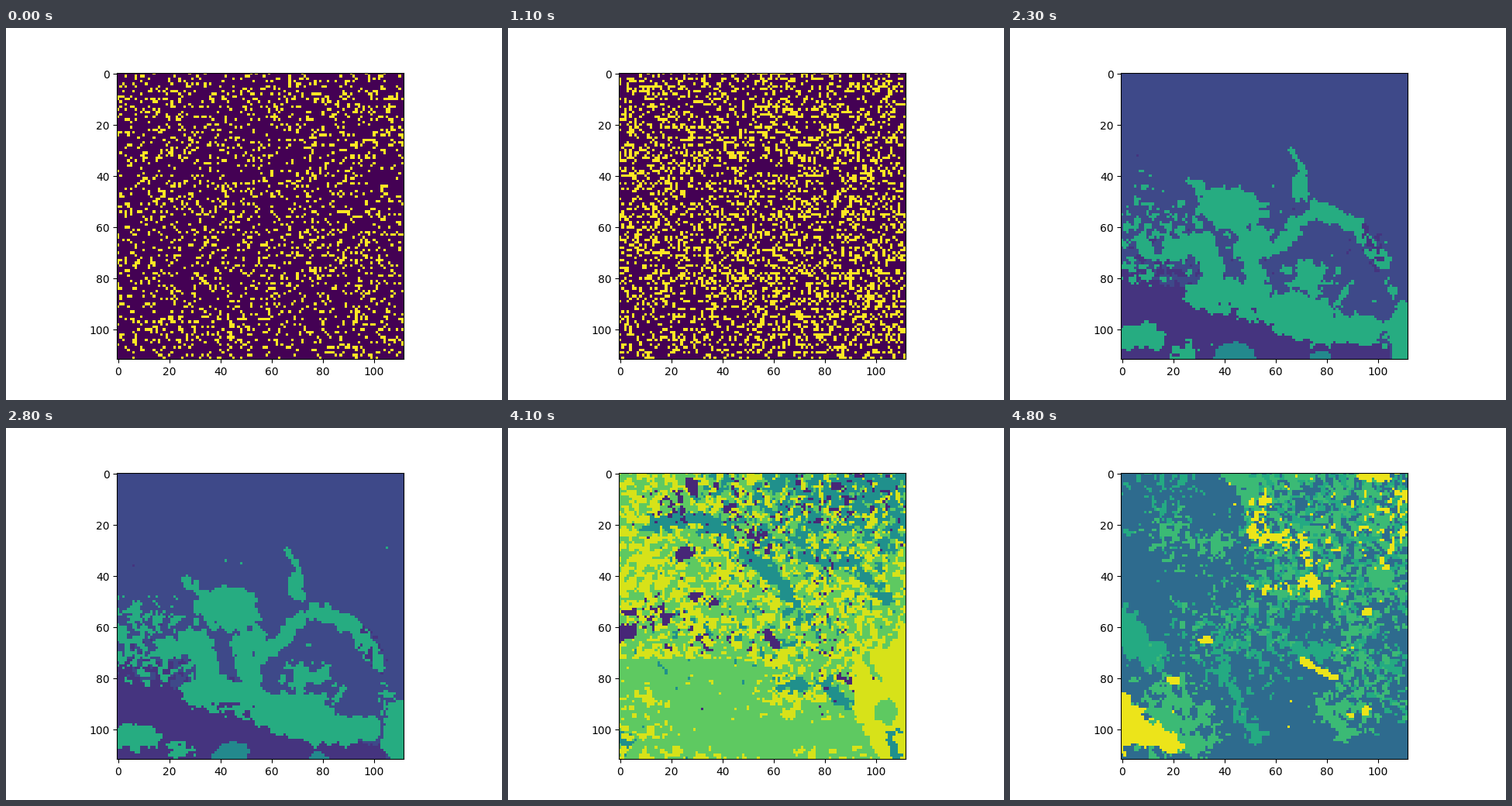
A matplotlib script that plays this animation: 640x480 px, repeating every 4.9 s.

```python
import numpy as np
import matplotlib.pyplot as plt
from matplotlib.animation import FuncAnimation

SIZE, FRAMES, INTERVAL = 112, 49, 100
Y, X = np.mgrid[0:SIZE, 0:SIZE].astype(float)


def ramp(a, lo, hi):
    return np.clip((a - lo) / (hi - lo), 0, 1)


def bell(x, y, sx, sy):
    return np.exp(-((X - x) / sx) ** 2 - ((Y - y) / sy) ** 2)


def ellipse(x, y, rx, ry, tilt=0):
    """Approximate depth inside a tilted ellipse, negative outside."""
    c, s = np.cos(tilt), np.sin(tilt)
    u, v = (X - x) * c + (Y - y) * s, (Y - y) * c - (X - x) * s
    return (1 - np.hypot(u / rx, v / ry)) * min(rx, ry)


def stroke(width, *pts):
    """Depth inside a polyline with round ends."""
    dist = np.full((SIZE, SIZE), np.inf)
    for (x0, y0), (x1, y1) in zip(pts, pts[1:]):
        dx, dy = x1 - x0, y1 - y0
        t = np.clip(((X - x0) * dx + (Y - y0) * dy) / (dx * dx + dy * dy), 0, 1)
        dist = np.minimum(dist, np.hypot(X - x0 - t * dx, Y - y0 - t * dy))
    return width - dist


def smooth(a, passes):
    for _ in range(passes):
        for axis in (0, 1):
            a = (np.roll(a, 1, axis) + 2 * a + np.roll(a, -1, axis)) / 4
    return a / a.std()


class Canvas:
    def __init__(self, base, seed):
        self.rng = np.random.default_rng(seed)
        self.grid = np.full((SIZE, SIZE), base)

    def noise(self, passes):
        return smooth(self.rng.standard_normal((SIZE, SIZE)), passes)

    def fill(self, level, depth, rough=0.8):
        """Solid shape with a ragged edge."""
        self.grid[depth + rough * self.noise(1) > 0] = level

    def scatter(self, level, density, grain=1):
        """Speckles covering the given share of each neighbourhood."""
        n = self.noise(grain) + 0.4 * self.noise(0)
        rank = n.ravel().argsort().argsort().reshape(n.shape) / n.size
        self.grid[rank < density] = level


def figures(seed):
    low, sky, teal, green = 0.15, 0.22, 0.47, 0.62
    c = Canvas(sky, seed)
    c.fill(low, Y - 78 - 0.28 * X - 40 * (X > 104))
    c.scatter(low, 0.6 * bell(10, 76, 20, 7))
    c.scatter(green, 0.6 * bell(6, 66, 26, 14) * (Y < 84))
    # hat, shoulders and the long body
    c.fill(green, ellipse(43, 53, 13, 8.5, 0.15))
    c.fill(green, stroke(2, (28, 43), (34, 48)))
    c.fill(green, stroke(4.5, (20, 68), (32, 66), (36, 82), (54, 88)))
    c.fill(green, stroke(4, (54, 63), (48, 67), (53, 82)))
    c.fill(green, stroke(3, (56, 70), (64, 66), (69, 58)))
    c.fill(green, stroke(5, (30, 86), (50, 92), (70, 93), (78, 101), (98, 100)))
    c.fill(green, ellipse(70, 95, 17, 9, 0.25))
    c.scatter(low, 0.7 * bell(44, 95, 6, 4))
    c.scatter(green, 1.1 * bell(74, 79, 9, 6), 2)
    c.fill(green, stroke(1, (84, 90), (88, 84)), 0.3)
    # feather and the arc beside it
    c.fill(green, stroke(1, (66, 30), (71, 38), (72, 50)), 0.3)
    c.fill(green, ellipse(69.5, 44, 3, 6), 0.3)
    c.fill(green, stroke(1.7, (70, 57), (77, 55), (82, 57)), 0.4)
    c.fill(green, stroke(3, (77, 53), (92, 60), (102, 74)))
    c.scatter(low, 0.6 * bell(98, 69, 4, 6))
    # corners
    c.fill(green, ellipse(111, 102, 8, 13))
    c.scatter(green, 0.7 * bell(106, 87, 4, 6))
    c.fill(green, ellipse(6, 103, 11, 5))
    c.scatter(green, bell(25, 109, 5, 4))
    c.fill(teal, ellipse(44, 111, 8, 6), 0.4)
    c.fill(teal, ellipse(78, 111, 4, 2), 0.3)
    return c.grid


def foliage(seed):
    low, teal, green, high = 0.15, 0.47, 0.66, 1.0
    c = Canvas(high, seed)
    c.scatter(teal, 0.5 * ramp(82 - X, 0, 50) * ramp(Y, 15, 45) * (Y < 82))
    edge = 27 + 7 * np.sin(X / 9) - 6 * bell(52, 20, 12, 60)
    c.scatter(low, 0.9 * ramp(edge + 9 - Y, 0, 18), 2)
    c.scatter(high, 0.25 * bell(60, 18, 50, 8))
    c.scatter(low, 0.35 * bell(32, 38, 26, 18), 2)
    for level, share in ((teal, 0.25), (green, 0.15)):
        c.scatter(level, share * ramp(12 - Y, 0, 10) * (X < 92))
    c.scatter(teal, 0.6 * bell(0, 28, 6, 12))
    c.fill(green, stroke(1.2, (5, 40), (16, 42)))
    # dark clumps
    c.fill(low, stroke(2, (-2, 45), (14, 46)))
    c.fill(low, stroke(2.3, (34, 30), (41, 42), (49, 54)))
    c.fill(low, stroke(2.5, (66, 22), (74, 38)))
    c.fill(low, stroke(2, (81, 18), (84, 38)))
    c.fill(low, ellipse(48, 70, 10, 2.5, 0.15))
    c.fill(low, ellipse(65, 78, 5, 3))
    c.fill(low, ellipse(73, 58, 3, 2))
    c.fill(low, stroke(3, (95, 58), (99, 74)))
    # teal slope and its offshoots
    c.fill(teal, stroke(7, (12, 84), (34, 88), (48, 93)))
    c.fill(teal, stroke(4.5, (46, 90), (58, 100), (66, 112)))
    c.fill(teal, stroke(1.5, (64, 80), (63, 94)))
    c.fill(teal, stroke(1.5, (64, 67), (70, 73)))
    c.scatter(teal, bell(38, 103, 9, 4), 2)
    c.scatter(teal, 0.9 * ramp(stroke(6, (101, 44), (108, 76)), -1, 4), 2)
    c.fill(teal, stroke(2.5, (81, 77), (90, 86), (91, 96)))
    c.fill(teal, stroke(1.5, (74, 111), (98, 107)))
    c.scatter(low, 0.9 * bell(83, 90, 9, 5), 2)
    c.fill(low, stroke(1.3, (97, 94), (104, 91), (112, 87)))
    c.fill(low, ellipse(92, 102, 5, 2.5, 0.6))
    c.scatter(low, 0.5 * bell(9, 108, 6, 5))
    return c.grid


def meadow(seed):
    low, teal, green, high = 0.11, 0.5, 0.75, 0.94
    c = Canvas(green, seed)
    above = Y < 73 + 0.3 * ramp(X, 48, 92) * 40
    c.scatter(high, above * (0.45 + 0.2 * bell(12, 34, 14, 18)))
    c.scatter(teal, 0.45 * ramp(X, 18, 60) * ramp(46 - Y, 0, 30)
              + 0.25 * bell(98, 6, 24, 16))
    c.scatter(teal, 0.14 * bell(58, 62, 36, 14))
    # teal streaks
    c.fill(teal, stroke(2.8, (12, 20), (28, 17), (42, 21)), 1.5)
    c.fill(teal, stroke(2.5, (48, 30), (58, 38), (69, 51)), 1.5)
    c.fill(teal, stroke(2, (72, 34), (92, 35), (101, 47), (107, 50)), 1.2)
    # bright right side
    c.fill(high, np.minimum(X - 91 - 0.3 * ramp(Y, 92, 112) * 36,
                            Y - 66 - 3 * np.cos(X / 4)))
    c.fill(green, stroke(1.2, (93, 69), (101, 79)))
    c.fill(green, ellipse(104, 93, 5, 5))
    c.scatter(high, 0.6 * bell(66, 87, 16, 7))
    c.fill(teal, ellipse(68, 83, 6, 2.5))
    c.fill(teal, stroke(2.5, (80, 82), (88, 90)))
    c.fill(teal, stroke(2, (106, 102), (107, 112)))
    c.scatter(teal, 0.7 * bell(2, 103, 5, 4))
    c.scatter(high, 0.3 * bell(6, 98, 14, 14))
    c.scatter(high, 0.5 * ramp(Y, 106, 112) * (X < 100), 2)
    # dark flecks
    c.fill(low, ellipse(28, 5, 2.5, 4, -0.4), 0.4)
    c.scatter(low, 0.4 * ramp(stroke(6, (36, 2), (54, 28)), 0, 6))
    c.scatter(low, 0.25 * bell(92, 9, 14, 8))
    c.scatter(low, 0.5 * bell(20, 12, 5, 4))
    c.scatter(low, 0.06 * bell(62, 18, 34, 24), 0)
    c.scatter(low, 0.07 * bell(81, 58, 8, 26), 0)
    c.fill(low, ellipse(25, 31, 3, 2))
    c.fill(low, ellipse(2, 62, 5, 3.5))
    c.fill(low, stroke(1.2, (2, 54), (6, 54)), 0.4)
    c.scatter(low, 0.6 * bell(14, 56, 8, 5))
    c.fill(low, stroke(1, (28, 48), (37, 50)))
    c.fill(low, stroke(1.5, (57, 62), (61, 67)), 0.4)
    c.scatter(low, 0.25 * bell(35, 67, 14, 4))
    c.fill(low, stroke(0.8, (85, 79), (89, 81)), 0.3)
    return c.grid


def hillside(seed):
    teal, green, high = 0.61, 0.68, 0.97
    c = Canvas(0.35, seed)
    crown = ramp(X - 38 - 0.2 * Y, 0, 14) * ramp(56 - Y, 0, 10)
    c.scatter(teal, 0.4 * crown)
    c.scatter(green, 0.37 * crown)
    c.fill(green, stroke(3.5, (40, -2), (49, 4), (51, 10)))
    c.fill(green, ellipse(69, 0, 7, 4))
    c.scatter(teal, 0.25 * bell(18, 8, 14, 14))
    c.scatter(green, 0.7 * bell(19, 25, 8, 8))
    c.scatter(green, 0.8 * bell(36, 28, 6, 6))
    c.fill(green, ellipse(101, 41, 6, 4, 0.8))
    c.scatter(teal, 0.5 * bell(50, 64, 24, 15))
    c.scatter(green, 0.16 * bell(48, 56, 24, 16))
    c.scatter(green, 0.6 * bell(89, 64, 6, 16))
    right = ramp(X, 84, 96) * ramp(Y, 48, 54) * ramp(103 - Y, 0, 8)
    c.scatter(teal, 0.24 * right)
    c.scatter(green, 0.17 * right)
    # teal patches
    c.fill(teal, stroke(6, (1, 58), (4, 66), (13, 70)), 1.2)
    c.fill(teal, ellipse(75, 69, 9, 3.5), 1.2)
    c.fill(teal, stroke(2, (39, 78), (44, 88), (53, 103)), 1.3)
    c.fill(green, stroke(2.5, (78, 90), (88, 102)), 1.2)
    c.scatter(green, 0.7 * bell(88, 90, 8, 7))
    # bright corner
    c.scatter(green, 1.15 * bell(16, 99, 15, 12), 2)
    c.fill(green, ellipse(26, 106, 7, 4))
    c.scatter(green, 0.8 * bell(19, 81, 5, 3))
    c.fill(high, np.minimum(Y - 86 - 0.8 * X, 107 - Y), 1.2)
    c.fill(high, ellipse(20, 81, 3, 1.5), 0.3)
    c.fill(high, ellipse(20, 107, 2.5, 2.5), 0.3)
    # highlights
    c.fill(high, stroke(1.3, (70, 73), (83, 80)), 0.3)
    c.fill(high, ellipse(99, 0, 6, 3))
    c.scatter(high, 0.3 * bell(108, 10, 8, 20))
    c.scatter(high, 0.5 * bell(53, 19, 4, 9))
    c.scatter(high, 0.55 * bell(60, 26, 7, 3))
    c.scatter(high, 0.6 * ramp(stroke(3, (71, 24), (75, 47)), 0, 2))
    c.scatter(high, 0.45 * bell(67, 45, 13, 2))
    c.scatter(high, 0.08 * bell(88, 24, 18, 20))
    for x, y, rx in ((95, 54, 2.5), (33, 65, 2.5), (95, 93, 2.5), (89, 94, 1.5)):
        c.fill(high, ellipse(x, y, rx, 1.5), 0.4)
    return c.grid


def static(i):
    """Binary noise that thickens over time while one corner stays dim."""
    rng = np.random.default_rng(100 + i)
    rows = 1 + 0.2 * rng.standard_normal((SIZE, 1))
    density = (0.165 + 0.0115 * i) * rows
    corner = ramp(Y, 74, 82) * ramp(62 - X, 0, 24)
    density = density * (1 - 0.5 * corner * ramp(i, 9, 16))
    return (rng.random((SIZE, SIZE)) < density).astype(float)


def picture(i):
    for end, scene in ((20, static), (29, figures), (38, foliage), (45, meadow)):
        if i < end:
            return scene(i)
    return hillside(i)


fig, ax = plt.subplots(figsize=(6.4, 4.8), dpi=100)
image = ax.imshow(static(0), cmap="viridis", vmin=0, vmax=1, interpolation="nearest")


def update(i):
    image.set_data(picture(i))
    return (image,)


anim = FuncAnimation(fig, update, frames=FRAMES, interval=INTERVAL, repeat=True)
plt.show()
```
